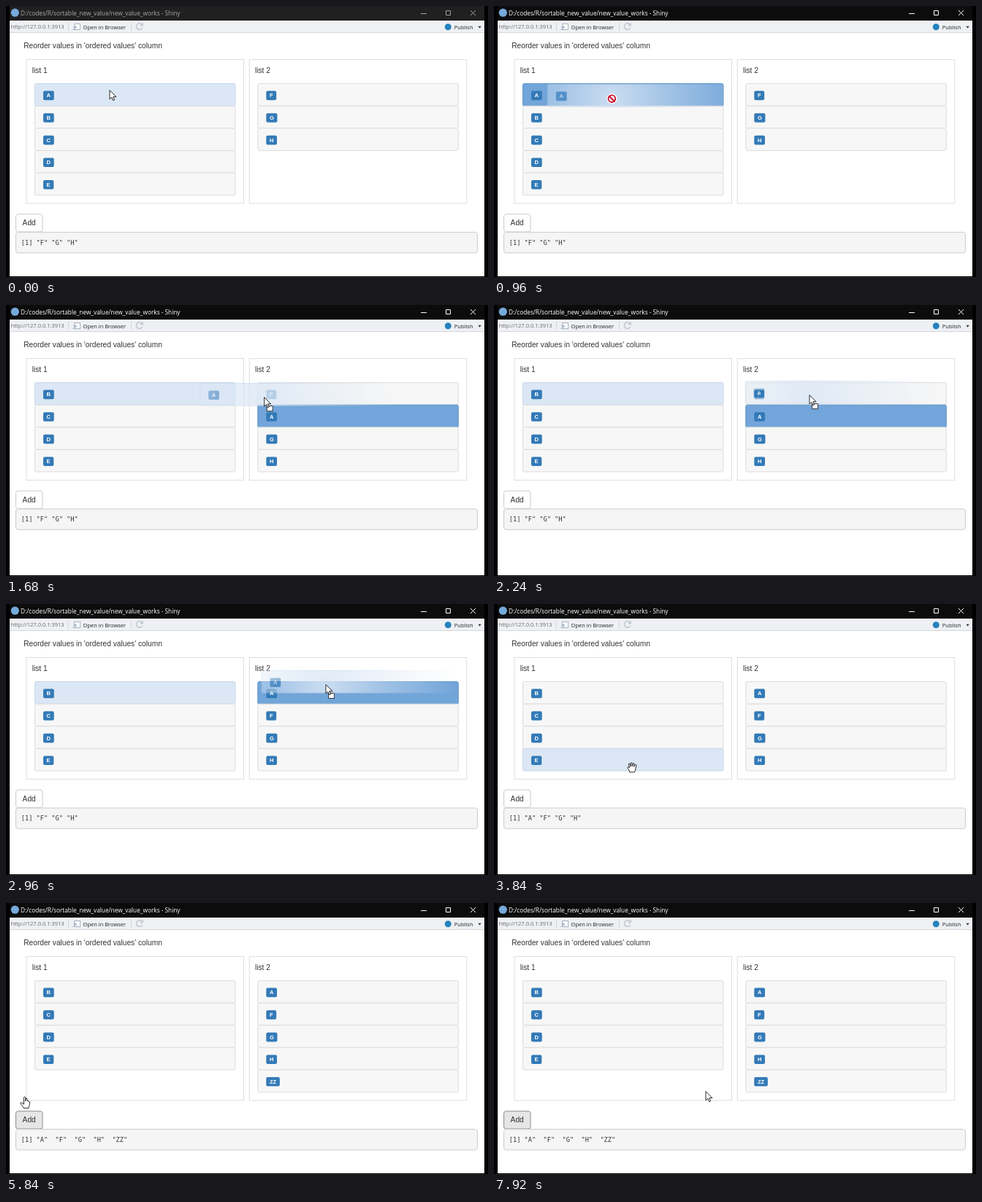
These frames come from a looping animation (660 px wide and 372 px high, 8 s). An HTML page:

```html
<!DOCTYPE html>
<html lang="en">
<head>
<meta charset="utf-8">
<title>Sortable lists</title>
<style>
html, body { margin: 0; width: 100%; height: 100%; overflow: hidden; background: #fff; }
svg { display: block; width: 100vw; height: 100vh; }
text { white-space: pre; font: 10.2px "Liberation Sans", Arial, sans-serif; fill: #333; }
.ui { font: 7.5px "Open Sans", "Noto Sans", sans-serif; fill: #222; }
.title { font-size: 8.28px; }
.mono { font: 8.65px "DejaVu Sans Mono", monospace; }
.badge { font-size: 7.65px; font-weight: bold; fill: #fff; text-anchor: middle; }
.ink { fill: none; stroke-width: 1; }
.cursor { fill: #fff; stroke: #111; stroke-width: .9; stroke-linejoin: round; stroke-linecap: round; }
</style>
</head>
<body>
<svg viewBox="0 0 660 372">
  <defs>
    <radialGradient id="fade" gradientUnits="userSpaceOnUse" cx="0" cy="0" r="180">
      <stop offset="0" stop-color="#fff" stop-opacity=".85"/>
      <stop offset=".4" stop-color="#fff" stop-opacity=".48"/>
      <stop offset="1" stop-color="#fff" stop-opacity="0"/>
    </radialGradient>
    <mask id="halo" maskUnits="userSpaceOnUse" x="-180" y="-180" width="380" height="360">
      <rect x="-180" y="-180" width="380" height="360" fill="url(#fade)"/>
    </mask>
  </defs>

  <rect width="660" height="372" fill="#000"/>
  <rect x="5" y="20" width="650" height="351" fill="#fff"/>
  <rect id="bar" x="5" width="650" height="20"/>
  <circle cx="12.3" cy="9.2" r="5.6" fill="#75aadb"/>
  <text id="title" class="ui title" x="20" y="12.8">D:/codes/R/sortable_new_value/new_value_works - Shiny</text>
  <path id="controls" class="ink" stroke-width=".9" d="M568 10.5h8M602.5 6.5h6v6h-6ZM636 6l7 7M643 6l-7 7"/>

  <rect x="5" y="20" width="650" height="16" fill="#eef0f4"/>
  <path class="ink" stroke="#d3d7dc" d="M5 36.5H655M85.5 23V34M171.5 23V34"/>
  <text class="ui" x="6.8" y="31.4" style="fill:#666">http://127.0.0.1:3913</text>
  <rect x="93.5" y="24.5" width="8" height="8" fill="#fff" stroke="#a9b4c0"/>
  <path class="ink" stroke="#8ba3bf" d="M91.5 33l4.5-4.5M93 28.5h3v3"/>
  <text class="ui" x="105.6" y="31.8">Open in Browser</text>
  <path class="ink" stroke="#c0c6cd" style="stroke-width:1.5" d="M186.6 30A4.3 4.3 0 1 1 186 25.2M187.2 23.4v3.2h-3.4"/>
  <circle cx="605.3" cy="28.8" r="4.5" fill="#2383bd"/>
  <text class="ui" x="613.8" y="31.8">Publish</text>
  <path d="M646.4 27.8h4.4l-2.2 2.7Z" fill="#333"/>

  <text x="24.2" y="58.2">Reorder values in 'ordered values' column</text>
  <g id="page"></g>
  <g id="pointer"></g>
</svg>
<script>
const LOOP = 8000, ROW = 30.6, TOP = 106.6, ROW_W = 274.5;
const LEFT = [39.5, 344.8];
const PRESS = 760, ENTER = 1640, SWAP = 2560, DROP = 3080, PRINT = 3200, CLICK = 5040, ADDED = 5120, LEAVE = 6000;

// time, x, y of the pointer
const path = [
  [80, 142, 116], [400, 126, 127], [PRESS, 126, 127], [1440, 294, 128],
  [1960, 428, 126], [2240, 432, 124], [2480, 434, 122], [2960, 438, 111],
  [3360, 438, 111], [3840, 189, 224], [4160, 187, 225], [4720, 23, 266],
  [LEAVE, 23, 266], [7200, 290, 259]
];

const colors = {
  plain: ['#f7f7f7', '#dcdcdc'],
  hover: ['#dbe7f5', '#c6d6e8'],
  picked: ['#72a5d9', '#5c92c9']
};
const glyph = { E: .667, F: .611, G: .778, Z: .611 };

const $ = id => document.getElementById(id);
const ease = u => u * u * (3 - 2 * u);

function pointerAt(t) {
  const i = path.findIndex(p => p[0] > t);
  if (i === 0) return path[0].slice(1);
  if (i < 0) return path[path.length - 1].slice(1);
  const [t0, x0, y0] = path[i - 1], [t1, x1, y1] = path[i];
  const u = ease((t - t0) / (t1 - t0));
  return [x0 + (x1 - x0) * u, y0 + (y1 - y0) * u];
}

function box(x, y, w, h, [fill, stroke], r = 2) {
  return `<rect x="${x}" y="${y}" width="${w}" height="${h}" rx="${r}" fill="${fill}" stroke="${stroke}"/>`;
}

function row(x, y, label, look) {
  const w = 9.2 + 7.65 * [...label].reduce((s, c) => s + (glyph[c] || .722), 0);
  return box(x, y, ROW_W, ROW, colors[look]) +
    `<rect x="${x + 11.5}" y="${y + 10}" width="${w}" height="12.6" rx="2" fill="#337ab7"/>` +
    `<text class="badge" x="${x + 11.5 + w / 2}" y="${y + 18.7}">${label}</text>`;
}

const arrow = '<path d="M0 0V12L2.8 9.4 4.7 13.7 6.6 12.9 4.8 8.7H8.6Z"/>';
const cursors = {
  arrow,
  copy: `<rect x="3.5" y="11.5" width="8" height="7" stroke-dasharray="1.5 1"/>${arrow}`,
  grab: '<path d="M-3.2 6.5C-3.6 4-6 2-6.2.2-5.6-1-4.2-.4-3.4.8L-4.6-3.8C-4.6-5.4-3-5.2-2.7-4L-1.8-1-2-5.2C-1.8-6.7-.2-6.6 0-5.2L.3-1.2 1.2-5C1.8-6.2 3.1-5.7 3-4.4L2.5-.8 4.2-3.2C5.2-4.2 6.4-3.4 5.8-2 4.8 1 5.2 3 3.6 6.5Z"/>',
  finger: '<path d="M1.2 1.2C1.2-.4 3.6-.4 3.6 1.2V6C4-.0 6-.0 6 6 6.3 5 8 5.2 8 6.8 8.6 6 9.6 6.6 9.4 8 9.4 12 8.6 12.4 8 15.6H1.2C.8 13.4-2.8 11-3.2 8.8-2.8 7.4-.8 8 1.2 10Z"/>',
  denied: '<circle r="5" stroke="#fff" stroke-width="4"/><path d="M-3.5-3.5L3.5 3.5" stroke="#c8102e" stroke-width="2"/><circle r="4.8" fill="none" stroke="#c8102e" stroke-width="1.9"/>'
};

function lists(t) {
  const one = [...'BCDE'], two = [...'FGH'];
  if (t < ENTER) one.unshift('A');
  else two.splice(t < SWAP ? 1 : 0, 0, 'A');
  if (t >= ADDED) two.push('ZZ');
  return [one, two];
}

function output(t) {
  if (t < PRINT) return '[1] "F" "G" "H"';
  return t < ADDED ? '[1] "A" "F" "G" "H"' : '[1] "A"  "F"  "G"  "H"  "ZZ"';
}

function render(t) {
  const [px, py] = pointerAt(t);
  const dragging = t >= PRESS && t < DROP;
  const both = lists(t);
  const height = 44.5 + ROW * Math.max(both[0].length, both[1].length);
  const addY = 73.5 + height + 14.8, outY = addY + 24.8;
  let overRow = false, html = '';

  both.forEach((items, k) => {
    const x = LEFT[k];
    html += box(x - 11.5, 73.5, 297.5, height, ['#fff', '#dedede'], 0) +
      `<text x="${x - 3.8}" y="91.6">list ${k + 1}</text>`;
    items.forEach((label, i) => {
      const y = TOP + ROW * i;
      const inside = px > x && px < x + ROW_W && py > y && py < y + ROW;
      let look = 'plain';
      if (dragging) {
        if (label === 'A') look = 'picked';
        else if (k === 0 && i === 0) look = 'hover';
      } else if (inside) {
        look = 'hover';
        overRow = true;
      }
      html += row(x, y, label, look);
    });
  });

  const overAdd = px > 13 && px < 50 && py > addY && py < addY + 24;
  const addLook = t >= CLICK ? ['#e6e6e6', '#8c8c8c'] : overAdd ? ['#e6e6e6', '#adadad'] : ['#fff', '#ccc'];
  html += box(13.5, addY, 36.5, 24.2, addLook, 3) +
    `<text x="22.6" y="${addY + 15.6}">Add</text>` +
    box(13.5, outY, 632, 28.3, ['#f5f5f5', '#ccc'], 3) +
    `<text class="mono" x="20.8" y="${outY + 17.2}">${output(t)}</text>`;
  $('page').innerHTML = html;

  let kind = 'arrow';
  if (dragging) kind = t < ENTER ? 'denied' : 'copy';
  else if (overAdd || (t >= ADDED && t < LEAVE)) kind = 'finger';
  else if (overRow && t > 160) kind = 'grab';

  const ghost = dragging ? `<g mask="url(#halo)">${row(-88, -19.6, 'A', 'hover')}</g>` : '';
  $('pointer').setAttribute('transform', `translate(${px} ${py})`);
  $('pointer').innerHTML = `${ghost}<g class="cursor">${cursors[kind]}</g>`;

  const active = t >= PRESS;
  $('bar').setAttribute('fill', active ? '#0c0c0c' : '#202020');
  $('title').style.fill = active ? '#fff' : '#a8a8a8';
  $('controls').setAttribute('stroke', active ? '#fff' : '#a0a0a0');
}

const start = performance.now();
function tick() {
  render((performance.now() - start) % LOOP);
  requestAnimationFrame(tick);
}
tick();
</script>
</body>
</html>
```
